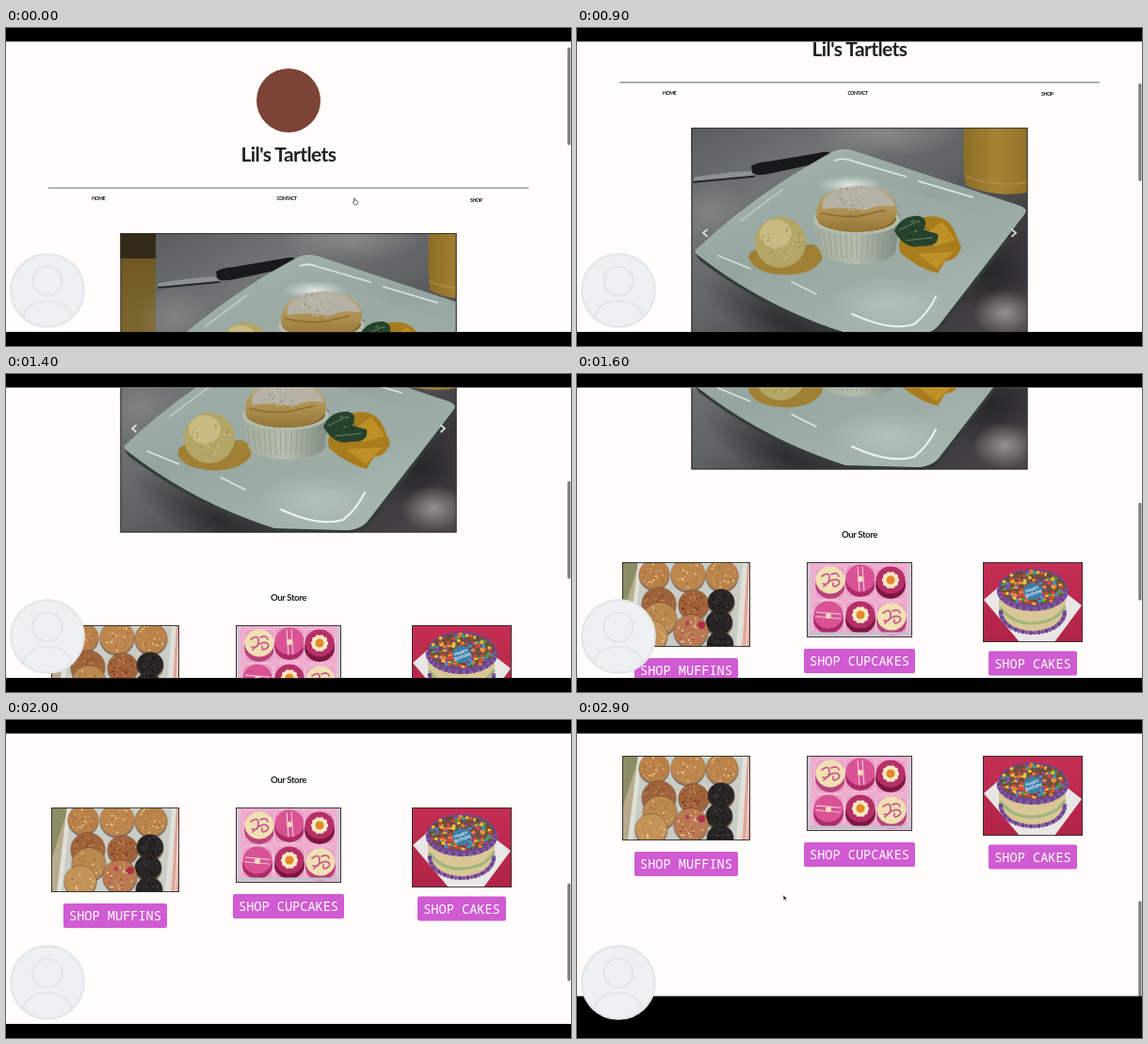
These frames come from a looping animation (600 by 338 pixels, 3000 ms). An HTML page:

```html
<!DOCTYPE html>
<html lang="en">
<head>
<meta charset="utf-8">
<title>Pastry shop page</title>
<style>
html, body { margin: 0; width: 100%; height: 100%; overflow: hidden; background: #000; }
svg { display: block; width: 600px; height: 338px; }
text { text-anchor: middle; }
.title { font: 700 21px Lato, "Open Sans", sans-serif; letter-spacing: -.6px; fill: #1f2225; }
.head { font: 700 9.6px Lato, "Open Sans", sans-serif; letter-spacing: -.4px; fill: #1f2225; }
.nav { font: 700 5.2px Lato, "Open Sans", sans-serif; letter-spacing: -.45px; fill: #111; }
.btn { font: 500 13.6px "Noto Sans Mono", "DejaVu Sans Mono", monospace; fill: #fff; }
</style>
</head>
<body>
<svg id="stage" viewBox="0 0 600 338" xmlns="http://www.w3.org/2000/svg"></svg>
<script>
const LOOP = 3000, STEP = 100, TOP = 14.2, FLOOR = 323.3, PAGE_END = 794.5;

let seed = 11;
const rnd = () => (seed = (seed * 16807) % 2147483647) / 2147483647;
const pick = list => list[Math.floor(rnd() * list.length)];
const repeat = (n, fn) => Array.from({ length: n }, (_, i) => fn(i)).join("");

const rect = (x, y, w, h, fill, more = "") =>
  `<rect x="${x}" y="${y}" width="${w}" height="${h}" fill="${fill}" ${more}/>`;
const oval = (x, y, rx, ry, fill, more = "") =>
  `<ellipse cx="${x}" cy="${y}" rx="${rx}" ry="${ry}" fill="${fill}" ${more}/>`;
const disc = (x, y, r, fill, more) => oval(x, y, r, r, fill, more);
const shape = (d, fill, more = "") => `<path d="${d}" fill="${fill}" ${more}/>`;
const line = (d, stroke, width, more = "") =>
  `<path d="${d}" fill="none" stroke="${stroke}" stroke-width="${width}" stroke-linecap="round" ${more}/>`;
const text = (x, y, cls, str) => `<text x="${x}" y="${y}" class="${cls}">${str}</text>`;
const clip = (id, x, y, w, h) => `<clipPath id="${id}">${rect(x, y, w, h, "#000")}</clipPath>`;
const grad = (id, dir, ...colors) => `<linearGradient id="${id}" ${dir}>` +
  colors.map((c, i) => `<stop offset="${i / (colors.length - 1)}" stop-color="${c}"/>`).join("") + "</linearGradient>";
const glow = (id, color) => `<radialGradient id="${id}"><stop stop-color="${color}"/>` +
  `<stop offset="1" stop-color="${color}" stop-opacity="0"/></radialGradient>`;
const crumbs = (n, x, y, r, colors, size) => repeat(n, () => {
  const a = rnd() * 6.28, d = Math.sqrt(rnd()) * r;
  return disc((x + Math.cos(a) * d).toFixed(1), (y + Math.sin(a) * d).toFixed(1), size, pick(colors));
});

const defs = `<defs>
  ${clip("view", 0, TOP, 600, FLOOR - TOP)}
  ${clip("frame", 121.5, 13, 357, 222.5)}
  ${clip("tray", 48, 93, 136, 90)}
  ${clip("box", 244, 93, 112, 80)}
  ${clip("board", 431, 93, 106, 85)}
  ${grad("steel", 'x1="0" y1="0" x2="1" y2="1"', "#595d5f", "#717475", "#5e6062", "#39373a", "#4b474a")}
  ${grad("plate", 'x1="0" y1="0" x2="0.7" y2="1"', "#a9b7b0", "#94a59f", "#a8b6af")}
  ${grad("cup", 'x1="0" y1="0" x2="1" y2="0"', "#8b6d26", "#a68334", "#92732b")}
  ${grad("bowl", 'x1="0" y1="0" x2="1" y2="0"', "#a2ab9b", "#b6bdaf", "#7d8a80")}
  ${grad("dome", 'x1="0" y1="0" x2="0" y2="1"', "#b9ae90", "#b09354", "#957535")}
  ${grad("prev", 'x1="0" y1="0" x2="0" y2="1"', "#6d5420", "#7d6830", "#54492a")}
  ${grad("tint", 'x1="0" y1="0" x2="0" y2="1"', "#c52f53", "#b02347")}
  ${glow("shine", "#a39e9c")} ${glow("shade", "#232224")} ${glow("white", "#dfe6e2")}
</defs>`;

function dessert() {
  const ribs = repeat(15, i => {
    const x = 256 + i * 5.9, sag = 6 * Math.sqrt(Math.max(0, 1 - ((x - 297) / 46) ** 2));
    return line(`M${x} ${120 + sag}L${297 + (x - 297) * .9} ${146 + sag}`, "#8c978b", .7);
  });
  return rect(121, 13, 358, 223, "url(#steel)") +
    oval(330, 20, 75, 24, "url(#shine)", 'opacity=".5"') +
    oval(140, 100, 40, 34, "url(#shine)", 'opacity=".35"') +
    oval(225, 222, 100, 34, "url(#shade)", 'transform="rotate(28 225 222)" opacity=".75"') +
    oval(440, 168, 56, 44, "url(#shade)", 'opacity=".8"') +
    oval(454, 210, 34, 25, "url(#shine)", 'opacity=".85"') +
    shape("M124 66Q160 60 189 59L188 64Q150 68 124 70Z", "#8b9194") +
    line("M124 71L188 65", "#232527", 2) +
    shape("M185 54Q190 50 204 49L262 39Q270 38 270 43Q268 48 256 51L205 62Q190 65 186 61Z", "#17191b") +
    shape("M411 13H479V82Q444 88 414 75Q409 70 411 13Z", "url(#cup)") +
    line("M412 64Q438 76 478 72", "#b7994f", 1.5, 'opacity=".6"') +
    shape("M126 148Q190 82 273 40Q283 35 295 39L470 98Q482 102 475 110L388 225Q379 237 360 236L282 234Q198 206 130 154Z", "#353b3b") +
    shape("M126 143Q190 82 273 38Q283 34 295 38L470 96Q481 100 474 107L386 221Q377 234 358 233L285 231Q200 204 130 150Q124 146 126 143Z", "url(#plate)") +
    shape("M183 137Q232 91 276 65Q284 60 295 63L421 103Q429 107 423 114L364 184Q356 193 343 190L200 150Z", "#9dada5", 'opacity=".7"') +
    oval(290, 74, 34, 10, "url(#white)") +
    oval(330, 200, 62, 28, "url(#white)", 'opacity=".3"') +
    line("M274 48Q283 44 294 49L349 65M363 70L420 87", "#d9e3e0", 1.8) +
    line("M292 211Q333 230 358 222Q372 211 381 193", "#eef3f1", 2) +
    line("M150 149L184 163M228 177L254 190", "#dbe4e1", 1.5) +
    line("M174 112L218 79", "#bccac6", 1.6) +
    shape("M182 151Q184 140 200 143L250 137Q263 142 260 154Q248 172 213 169Q187 166 182 151Z", "#9f8034") +
    oval(216, 135, 27, 27, "#b3a565") + oval(211, 126, 17, 15, "#c7ba83") +
    crumbs(30, 217, 135, 21, ["#998a4d", "#cfc28d"], .9) +
    shape("M250 107Q296 96 343 105L338 146Q330 158 297 158Q264 156 258 146Z", "url(#bowl)") + ribs +
    oval(297, 111, 46, 16, "#b5bbad") + oval(297, 110, 42, 14, "#856728") +
    shape("M254 109Q254 87 268 82Q298 70 326 80Q341 88 340 104Q335 123 297 124Q262 124 254 109Z", "url(#dome)") +
    shape("M261 93Q267 78 297 75Q333 79 338 97Q318 94 307 101Q283 96 261 100Z", "#b5b2a5") +
    line("M259 104Q281 109 300 107L327 101", "#8d6b2d", 1.6) +
    crumbs(36, 294, 88, 17, ["#87847a", "#cecbc0"], .8) +
    shape("M342 137Q348 111 371 108Q391 105 400 121L408 140Q404 154 391 155L383 168Q363 163 343 146Z", "#a97c1d") +
    shape("M362 131L388 113L402 133L380 139ZM361 147L400 145L382 163Z", "#bd9126") +
    shape("M337 123Q344 106 363 107Q374 110 368 122L383 126Q386 140 365 139Q348 143 337 123Z", "#27422d") +
    crumbs(18, 359, 124, 13, ["#4c7a4f", "#1c3021"], 1) +
    line("M342 122L363 112M350 133L377 130", "#688467", 1);
}

function muffins() {
  const tan = ["#c69059", "#d2a470", "#a86c38", "#edd0a0"];
  const cake = (x, y, r, fill, bits) => disc(x, y + 1, r + .7, "#5f3924", 'opacity=".6"') +
    oval(x, y, r, r * .94, fill) + crumbs(28, x, y, r * .85, bits, 1);
  const black = (x, y) => cake(x, y, 14, "#272525", ["#3f3b39", "#141414"]);
  return rect(48, 93, 136, 90, "#b8aa8e") +
    shape("M48 93H66L48 150Z", "#8b8d65") + shape("M172 93H184V183H166Z", "#dda59b") +
    repeat(3, i => line(`M${176 + i * 4} 93L${170 + i * 5} 183`, "#f2dfd4", 1.2)) +
    shape("M65 91L181 93L174 183H54Z", "#dfe1d9") + shape("M69 94L176 95L169 183H59Z", "#c9cdc5") +
    cake(82, 106, 16, "#b98047", tan) + cake(118, 106, 18, "#bd864d", tan) + cake(154, 107, 17, "#b98349", tan) +
    cake(87, 137, 18, "#9f633c", ["#bb8054", "#7f482b"]) + cake(124, 138, 16, "#a16239", ["#c28a59", "#713922"]) +
    black(153, 135) + black(151, 157) + black(152, 180) +
    cake(88, 153, 18, "#b9884e", tan) + cake(79, 171, 17, "#c49358", tan) +
    cake(121, 166, 18, "#b87950", ["#d49c72", "#b03a4d", "#efcfaa"]) +
    disc(132, 160, 4, "#ae3048") + disc(117, 158, 2.5, "#b34255");
}

function cupcakes() {
  const flower = (x, y) => repeat(10, i => {
    const a = i * Math.PI / 5;
    return disc((x + Math.cos(a) * 6.5).toFixed(1), (y + Math.sin(a) * 6.5).toFixed(1), 2.6, "#fbe9c4");
  }) + disc(x, y, 4.5, "#e28b28");
  const swirl = (x, y) => line(`M${x - 9} ${y - 5}q8 -6 8 2t-7 6M${x - 7} ${y + 6}q9 -10 15 -7q4 3 -1 6t-4 -3M${x + 1} ${y - 7}q7 -3 8 2`, "#c9568e", 1.7);
  const stripes = (x, y, turn) => `<g transform="rotate(${turn} ${x} ${y})">` +
    line(`M${x - 13} ${y - 3}h26M${x - 13} ${y + 2}h26`, "#f5d6dd", 1) + disc(x, y, 3, "#f4dcc0") + "</g>";
  const cell = (x, y, fill, side) => rect(x - 16.5, y - 16, 33, 36, "#e9a3c7", 'rx="7" stroke="#f8d4e6" stroke-dasharray="2 1.5"') +
    oval(x, y + 4, 16, 15, side) + oval(x, y - 1, 15.5, 14.5, fill);
  const cream = ["#f1e0b2", "#b9437d"], pink = ["#d95394", "#ab2b68"], plum = ["#b52f68", "#7d1740"];
  return rect(244, 93, 112, 80, "#d9c3d4") + rect(249, 94, 102, 76, "#efabcf") +
    cell(269, 113, ...cream) + swirl(269, 113) + cell(301, 111, ...pink) + stripes(301, 111, 86) +
    cell(333, 113, ...plum) + flower(333, 112) + cell(267, 150, ...pink) + stripes(267, 150, 5) +
    cell(301, 150, ...plum) + flower(301, 149) + cell(334, 152, ...cream) + swirl(334, 152) +
    line("M245 169H355", "#c3c1cb", 3);
}

function cake() {
  const hues = ["#d6473c", "#f2c534", "#3795cf", "#48a455", "#ee8237", "#704136", "#8c4cac"];
  const sweets = repeat(160, () => {
    const a = rnd() * 6.28, d = Math.sqrt(rnd());
    return oval((484 + Math.cos(a) * d * 34).toFixed(1), (120 + Math.sin(a) * d * 18).toFixed(1), 2, 1.7, pick(hues));
  });
  const trim = (y, rx, ry, n) => repeat(n, i => {
    const a = i / (n - 1) * Math.PI;
    return disc((484 + Math.cos(a) * rx).toFixed(1), (y + Math.sin(a) * ry).toFixed(1), 2.3, i % 2 ? "#68438e" : "#87599f");
  });
  return rect(431, 93, 106, 85, "url(#tint)") +
    shape("M432 133L456 112L522 128L536 139L507 178H470Z", "#e9e6e6") +
    shape("M448 120V146Q453 169 484 169Q515 166 519 146V120Z", "#d8c696") +
    line("M450 142Q463 159 484 158Q508 157 518 141", "#9fb57b", 3) +
    trim(146, 34, 22, 26) + oval(484, 121, 37, 21, "#704a94") + oval(484, 120, 35, 18, "#70503f") + sweets +
    oval(484, 124, 10, 9, "#397fa9") +
    `<g transform="rotate(-22 484 124)" font-family="Lato, sans-serif" font-size="5" font-weight="700" fill="#f5f7fb">` +
    text(484, 123, "", "Happy") + text(484, 128, "", "Birthday") + "</g>" + trim(123, 36, 20, 30);
}

const picture = (id, x, y, w, h, body) =>
  `<g clip-path="url(#${id})">${body}</g>` + rect(x + .5, y + .5, w - 1, h - 1, "none", 'stroke="#2d2d2d" stroke-width=".9"');
const button = (x, y, w, label) => rect(x, y, w, 26, "#d05bd2", 'rx="2"') + text(x + w / 2, y + 18, "btn", label);
const chevron = (x, k) => line(`M${x + k * 2} 121.5l${-k * 4} 3.5l${k * 4} 3.5`, "#dfe3e2", 1.7);

const page = disc(300, 77, 34, "#7c4337") +
  text(300, 142, "title", "Lil's Tartlets") +
  rect(45, 169.6, 510, .9, "#55575a") +
  text(98.2, 183.3, "nav", "HOME") + text(298, 183.3, "nav", "CONTACT") + text(499.3, 184.5, "nav", "SHOP") +
  `<g transform="translate(0 205)">` +
  picture("frame", 121.5, 13, 357, 222.5,
    `<g id="slide">${rect(-235, 13, 357, 223, "url(#prev)")}${rect(-235, 13, 357, 27, "#332a17")}${dessert()}</g>`) +
  chevron(136, 1) + chevron(464, -1) + "</g>" +
  text(300, 512.5, "head", "Our Store") +
  `<g transform="translate(0 446)">` +
  picture("tray", 48, 93, 136, 90, muffins()) + button(61, 195, 110, "SHOP MUFFINS") +
  picture("box", 244, 93, 112, 80, cupcakes()) + button(241, 185, 118, "SHOP CUPCAKES") +
  picture("board", 431, 93, 106, 85, cake()) + button(437, 187.5, 94, "SHOP CAKES") + "</g>";

const avatar = disc(44, 279, 38.7, "#eff0f2", 'stroke="#e4e6e9" stroke-width="2.2"') +
  `<circle cx="44" cy="269" r="15.5" fill="none" stroke="#e3e5e9" stroke-width="2.2"/>` +
  line("M18 308Q22 290 44 290Q66 290 70 308", "#e3e5e9", 2.2);

const stage = document.getElementById("stage");
stage.innerHTML = defs + rect(0, 0, 600, 338, "#000") +
  `<g clip-path="url(#view)">${rect(0, TOP, 600, FLOOR - TOP, "#fefdfb")}<g id="page">${page}</g>
  <rect id="bar" x="596.3" width="3.2" height="104" rx="1.6" fill="#7d7d7d"/></g>
  <rect id="floor" width="600" height="50" fill="#000"/>` + avatar +
  `<g id="hand">${shape("M369.6 181q.9 -.5 1.2 .5v1.7l2.2 .6q.8 .4 .5 1.4l-.6 2.7h-2.7l-1.9 -2.6q.2 -.9 1.3 -.1z", "#fff", 'stroke="#333" stroke-width=".7"')}</g>
  <g id="arrow">${shape("M219.2 186.3v5l1.2 -1l.9 1.9l.9 -.4l-.8 -1.8h1.6z", "#111", 'stroke="#fff" stroke-width=".3"')}</g>`;

const part = Object.fromEntries(["page", "slide", "bar", "floor", "hand", "arrow"].map(id => [id, document.getElementById(id)]));

// time, scroll offset, speed
const keys = [[0, 0, 0], [500, 22, .13], [1200, 205, .31], [1600, 339, .31], [2000, 446, .2], [2400, 500, .02], [2900, 501, 0], [3000, 501, 0]];

function scrollAt(t) {
  const i = keys.findIndex((k, n) => n && t <= k[0]);
  const [t0, y0, v0] = keys[i - 1], [t1, y1, v1] = keys[i];
  const d = t1 - t0, u = (t - t0) / d, w = 1 - u;
  return y0 * (1 + 2 * u) * w * w + v0 * d * u * w * w + y1 * u * u * (3 - 2 * u) - v1 * d * u * u * w;
}

function draw(now) {
  const t = Math.floor((now % LOOP) / STEP) * STEP;
  const y = scrollAt(t);
  part.page.setAttribute("transform", `translate(0 ${-y})`);
  part.slide.setAttribute("transform", `translate(${38 * Math.max(0, 1 - t / 300) ** 2} 0)`);
  part.bar.setAttribute("y", 20.4 + y * .343);
  part.floor.setAttribute("y", Math.min(FLOOR, PAGE_END - y));
  part.hand.style.display = t < 700 ? "" : "none";
  part.arrow.style.display = t >= 2700 ? "" : "none";
}

let start;
function tick(now) {
  start ??= now;
  draw(now - start);
  requestAnimationFrame(tick);
}
draw(0);
requestAnimationFrame(tick);
</script>
</body>
</html>
```
